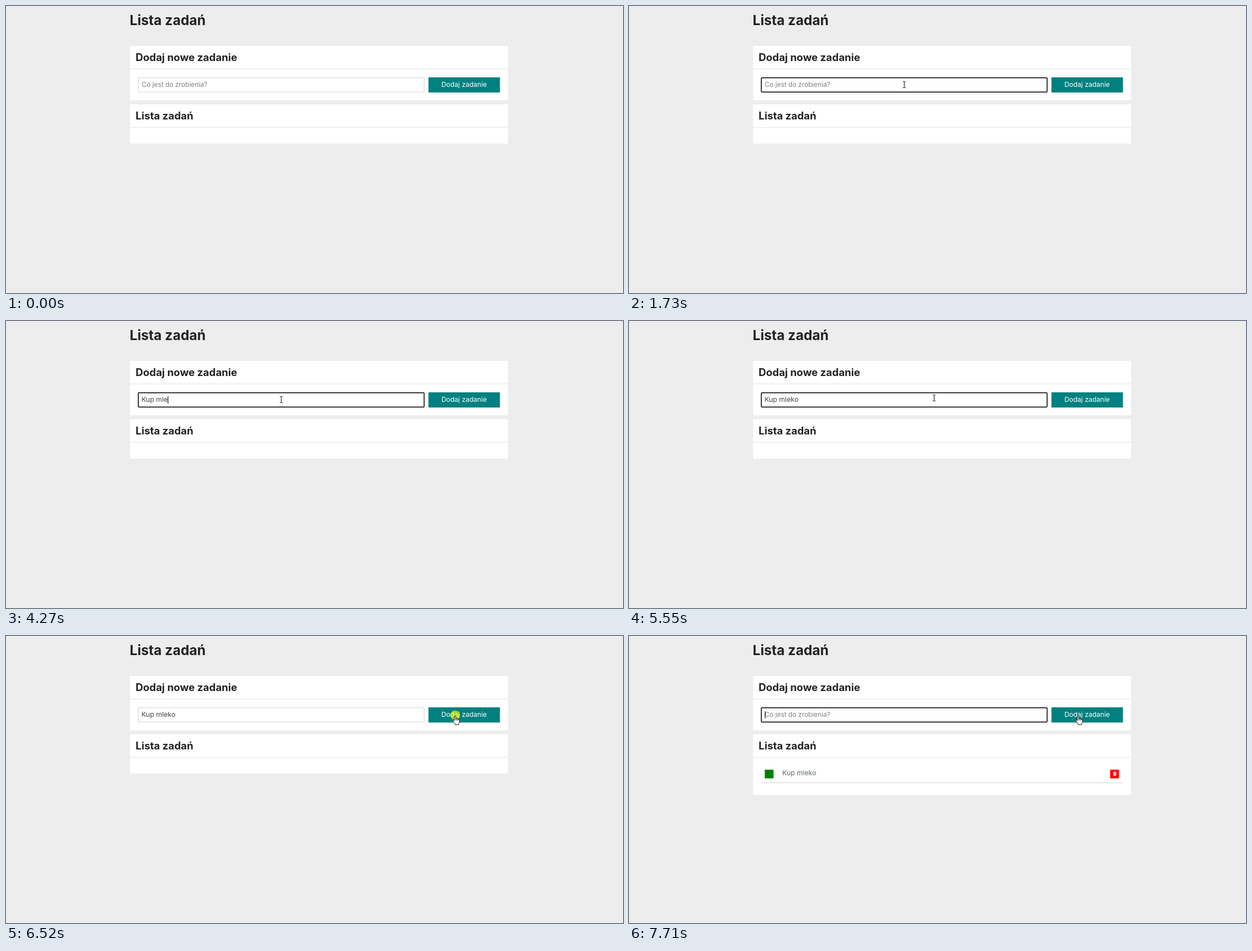
An HTML page that plays this animation: 1095 by 511 pixels, repeating every 8000 ms.

```html
<!DOCTYPE html>
<html lang="pl">
<head>
<meta charset="utf-8">
<title>Lista zadań</title>
<style>
  html, body { margin: 0; width: 100%; height: 100%; overflow: hidden; background: #ededed; }
  svg { display: block; width: 1095px; height: 511px; }
  text { font-family: Montserrat, Inter, sans-serif; font-size: 12.2px; white-space: pre; fill: #444; }
  .title { font-weight: 700; font-size: 24.2px; fill: #222; }
  .heading { font-weight: 700; font-size: 18.4px; fill: #222; }
  .rule { fill: #ebebeb; }
  .pointer { fill: #fff; stroke: #000; stroke-linejoin: round; }
</style>
</head>
<body>
<svg viewBox="0 0 1095 511">
  <rect width="1095" height="511" fill="#ededed"/>
  <text class="title" x="219.5" y="33.5">Lista zadań</text>

  <rect x="220" y="71" width="671" height="97" fill="#fff"/>
  <text class="heading" x="230" y="97.5">Dodaj nowe zadanie</text>
  <rect class="rule" x="220" y="111.3" width="671" height="1.5"/>
  <rect id="field" x="234.75" y="127.75" width="507.3" height="25.5" fill="#fff" stroke-width="1.5"/>
  <text id="placeholder" x="240.8" y="144.3" style="font-size:11.75px;fill:#808080">Co jest do zrobienia?</text>
  <text id="value" x="240.5" y="144.3"></text>
  <rect id="caret" y="134" width="1" height="13" fill="#000"/>
  <rect x="749.7" y="127" width="126.9" height="27" fill="#008080"/>
  <text x="813" y="144.3" text-anchor="middle" style="font-size:12px;fill:#fff">Dodaj zadanie</text>

  <rect id="list" x="220" y="175" width="671" fill="#fff"/>
  <text class="heading" x="230" y="201.5">Lista zadań</text>
  <rect class="rule" x="220" y="215.3" width="671" height="1.5"/>
  <g id="task">
    <rect x="241" y="238" width="15.5" height="15.5" fill="#008000"/>
    <text x="272" y="248.3" style="fill:#5f6b6b">Kup mleko</text>
    <rect x="854" y="238" width="15.5" height="15.5" fill="#f00"/>
    <path d="M858.8 242.2h2l.5-.7h1.4l.5 .7h2v1h-6.4zM859.2 243.7h5.6l-.4 5h-4.8z" fill="#fff"/>
    <path d="M860.8 244.5v3.4M862 244.5v3.4M863.2 244.5v3.4" stroke="#f00" stroke-width=".45"/>
    <rect x="234" y="260.5" width="643" height="1.3" fill="#ddd"/>
  </g>

  <circle id="halo" r="8.6" fill="#ff0"/>
  <g id="cursor">
    <path id="beam" d="M-2 -5.5H-1Q.5 -5.5 .5 -4.5Q.5 -5.5 2 -5.5H3M.5 -4.5V4.5M-2 5.5H-1Q.5 5.5 .5 4.5Q.5 5.5 2 5.5H3" fill="none" stroke="#111"/>
    <path id="arrow" class="pointer" stroke-width=".9" d="M0 0V15L3.5 11.8L5.8 17L8.2 16L5.9 10.9H10.6Z"/>
    <path id="hand" class="pointer" stroke-width=".9" d="M-1.2 .8Q0 -.6 1.2 .8V5.2Q2.5 4.2 3.6 5.6Q4.9 4.8 5.9 6.2Q7.4 5.6 7.9 7.2V11.2Q7.5 13 6.4 14.2V16H0V14.2L-3.8 9.4Q-4.8 7.8 -3.3 7.4Q-2.2 7.4 -1.2 8.8ZM1.2 5.2V8.2M3.6 5.6V8.4M5.9 6.2V8.6"/>
  </g>
</svg>
<script>
const LOOP = 8000;
const TASK = 'Kup mleko';
const KEY_TIMES = [2280, 2670, 3000, 3270, 3870, 4070, 4270, 4600, 4740];
const FOCUS = [[1280, 6390], [6650, LOOP]];
const CARET = [[1280, 1730], [2280, 3800], [3870, 5280], [5780, 6290], [6650, 7180], [7710, LOOP]];
const ADDED = 6650;
const TO_BUTTON = [[541, 137], [647, 140], [738, 152], [785, 164], [800, 158], [797, 142]];

const $ = id => document.getElementById(id);
const show = (id, on) => $(id).setAttribute('display', on ? 'inline' : 'none');
const set = (id, attrs) => Object.entries(attrs).forEach(([k, v]) => $(id).setAttribute(k, v));
const within = (t, spans) => spans.some(([a, b]) => t >= a && t < b);
const mix = (a, b, p) => a + (b - a) * p;
const clamp = p => Math.max(0, Math.min(1, p));

const stepped = (t, from, to, steps) =>
  clamp(Math.floor((t - from) / (to - from) * steps + .01) / steps);

function spline(points, p) {
  const pos = p * (points.length - 1);
  const i = Math.min(Math.floor(pos), points.length - 2);
  const u = pos - i;
  const at = k => points[Math.max(0, Math.min(points.length - 1, k))];
  return [0, 1].map(axis => {
    const [a, b, c, d] = [-1, 0, 1, 2].map(k => at(i + k)[axis]);
    return b + u / 2 * (c - a + u * (2 * a - 5 * b + 4 * c - d + u * (3 * (b - c) + d - a)));
  });
}

function cursorAt(t) {
  if (t < 1210) {
    const p = stepped(t, 190, 880, 10);
    const eased = 1 - (1 - p) ** 2;
    return [mix(1018, 485, eased), mix(495, 140, eased)];
  }
  if (t < 5550) return [mix(485, 488, stepped(t, 1210, 1470, 3)), 140];
  return spline(TO_BUTTON, stepped(t, 5550, 6320, 11));
}

function drawCursor(t) {
  const [x, y] = cursorAt(t).map(Math.round);
  const inRow = y >= 127 && y < 154;
  const overField = inRow && x >= 234 && x < 742;
  const overButton = inRow && x >= 750 && x < 877;
  show('cursor', t >= 190);
  show('beam', overField);
  show('hand', overButton);
  show('arrow', !overField && !overButton);
  set('cursor', { transform: `translate(${x} ${y})` });

  const firstClick = within(t, [[1210, 1470]]);
  const fading = within(t, [[1350, 1470], [6650, 6850]]);
  show('halo', firstClick || within(t, [[6390, 6850]]));
  set('halo', { cx: firstClick ? x - 1 : x, cy: y - 1, opacity: fading ? .3 : .62 });
}

function drawForm(t) {
  const added = t >= ADDED;
  const typed = added ? '' : TASK.slice(0, KEY_TIMES.filter(k => t >= k).length);
  const focused = within(t, FOCUS);
  $('value').textContent = typed;
  show('placeholder', !typed);
  set('field', focused ? { rx: 1.5, stroke: '#000' } : { rx: 0, stroke: '#e2e2e2' });
  show('caret', within(t, CARET));
  set('caret', { x: Math.round(240.6 + (typed ? $('value').getComputedTextLength() : 0)) });
  show('task', added);
  set('list', { height: added ? 108 : 70 });
}

function render(t) {
  drawForm(t);
  drawCursor(t);
}

const start = performance.now();
function tick() {
  render((performance.now() - start) % LOOP);
  requestAnimationFrame(tick);
}
tick();
</script>
</body>
</html>
```
